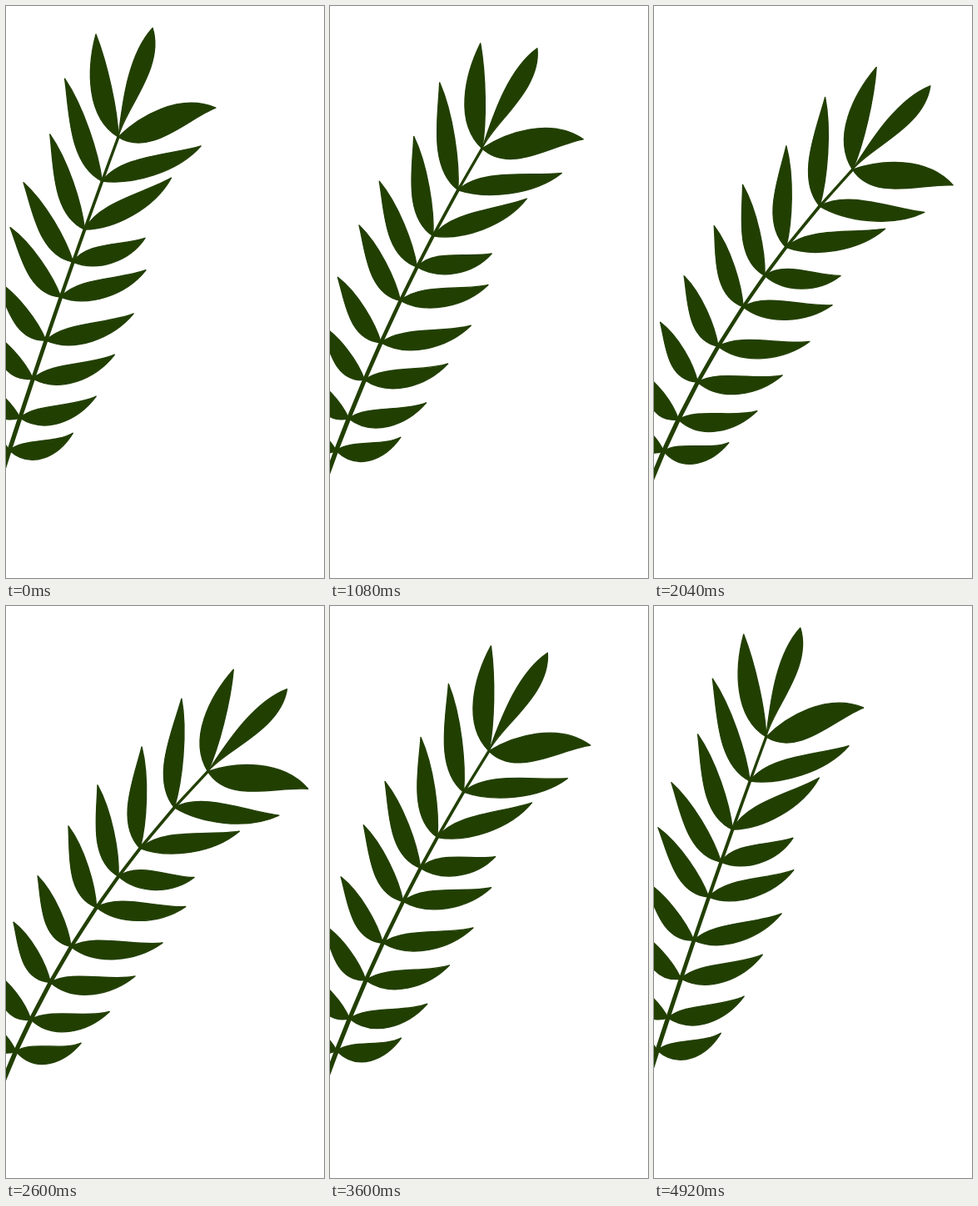
Recreate the animation shown at these times as an HTML page with a canvas. Size 382x686 px, loop 4.96 s.

```html
<!DOCTYPE html>
<html>
<head>
<meta charset="utf-8">
<style>
  html, body { margin: 0; width: 100%; height: 100%; overflow: hidden; background: #fff; }
  canvas { display: block; }
</style>
</head>
<body>
<canvas id="stage" width="382" height="686"></canvas>
<script>
const ctx = document.getElementById('stage').getContext('2d');
const LOOP = 4960;
const RAD = Math.PI / 180;

// Heights of the leaf joints above the lowest one, from the top down.
const heights = [376, 323, 265, 226, 184, 132, 86, 39, 0];
const ROOT = -49;
const rightLengths = [126, 121, 91, 107, 110, 102, 95, 79];

const turnAt = h => (8.2 + 0.05 * h) * RAD;

// A point on the stem: its resting place plus a shift along a shallow arc.
function stemPoint(h, bend) {
  const dx = 8 + 0.12 * h + 0.0004 * h * h;
  const dy = 1 + 0.02 * h + 0.00024 * h * h;
  const a = -0.33 * turnAt(h) * (1 - bend);
  const c = Math.cos(a) * bend, s = Math.sin(a) * bend;
  return [
    4 + 0.325 * h + 0.00006 * h * h + dx * c - dy * s,
    533 - h + dx * s + dy * c,
  ];
}

// Edges pass l1, l2 (left) and r1, r2 (right) px from the midline
// at about one and two thirds of the length. Angle 0 points up.
function drawLeaf(h, bend, angle, length, l1, l2, r1, r2) {
  const near = length * 0.25, far = length * 0.7;
  ctx.save();
  ctx.translate(...stemPoint(h, bend));
  ctx.rotate((angle - 90) * RAD + turnAt(h) * bend);
  ctx.beginPath();
  ctx.moveTo(0, 0);
  ctx.bezierCurveTo(near, 1.5 * l2 - 3 * l1, far, 1.5 * l1 - 3 * l2, length, 0);
  ctx.bezierCurveTo(far, 3 * r2 - 1.5 * r1, near, 3 * r1 - 1.5 * r2, 0, 0);
  ctx.fill();
  ctx.lineWidth = 1.4;
  ctx.stroke();
  ctx.restore();
}

function drawStem(bend) {
  const points = [...heights, ROOT].map(h => stemPoint(h, bend));
  points.slice(1).forEach((point, i) => {
    ctx.lineWidth = 3.4 + i * 0.28;
    ctx.beginPath();
    ctx.moveTo(...points[i]);
    ctx.lineTo(...point);
    ctx.stroke();
  });
}

function drawCrown(bend) {
  const top = heights[0];
  drawLeaf(top, bend, -12.4, 126, 19, 16, 4, 4);
  drawLeaf(top, bend, 17.4, 137, 7, 10, 5, 12);
  drawLeaf(top, bend, 73.3, 122, 14, 17, 16, 9);
}

// Leaves open wider and droop more towards the root; the second pair stands up.
function drawPair(i, bend) {
  const h = heights[i];
  const k = i - 4.5;
  const lift = Math.exp(-4 * (i - 2) ** 2);
  const leftAngle = -38 - 3.6 * k - 0.12 * k ** 3 + 7 * lift;
  const rightAngle = 70 + 0.6 * i - 12 * lift;
  drawLeaf(h, bend, leftAngle, 140 - 9.2 * i, 15.5, 10.5, 5.5, 6);
  drawLeaf(h, bend, rightAngle, rightLengths[i - 1],
    11 - i, 6.5 - 0.9 * i, 11 + 0.9 * i, 12.5 + 0.5 * i);
}

function draw(time) {
  const swing = Math.sin(Math.PI * (time + 80) / LOOP) ** 2;
  const bend = swing * (0.9 + 0.1 * swing);

  ctx.clearRect(0, 0, 382, 686);
  ctx.fillStyle = ctx.strokeStyle = '#223f02';
  ctx.lineCap = ctx.lineJoin = 'round';
  drawStem(bend);
  drawCrown(bend);
  for (let i = 1; i < heights.length; i++) drawPair(i, bend);
}

function frame() {
  draw(performance.now() % LOOP);
  requestAnimationFrame(frame);
}
frame();
</script>
</body>
</html>
```
